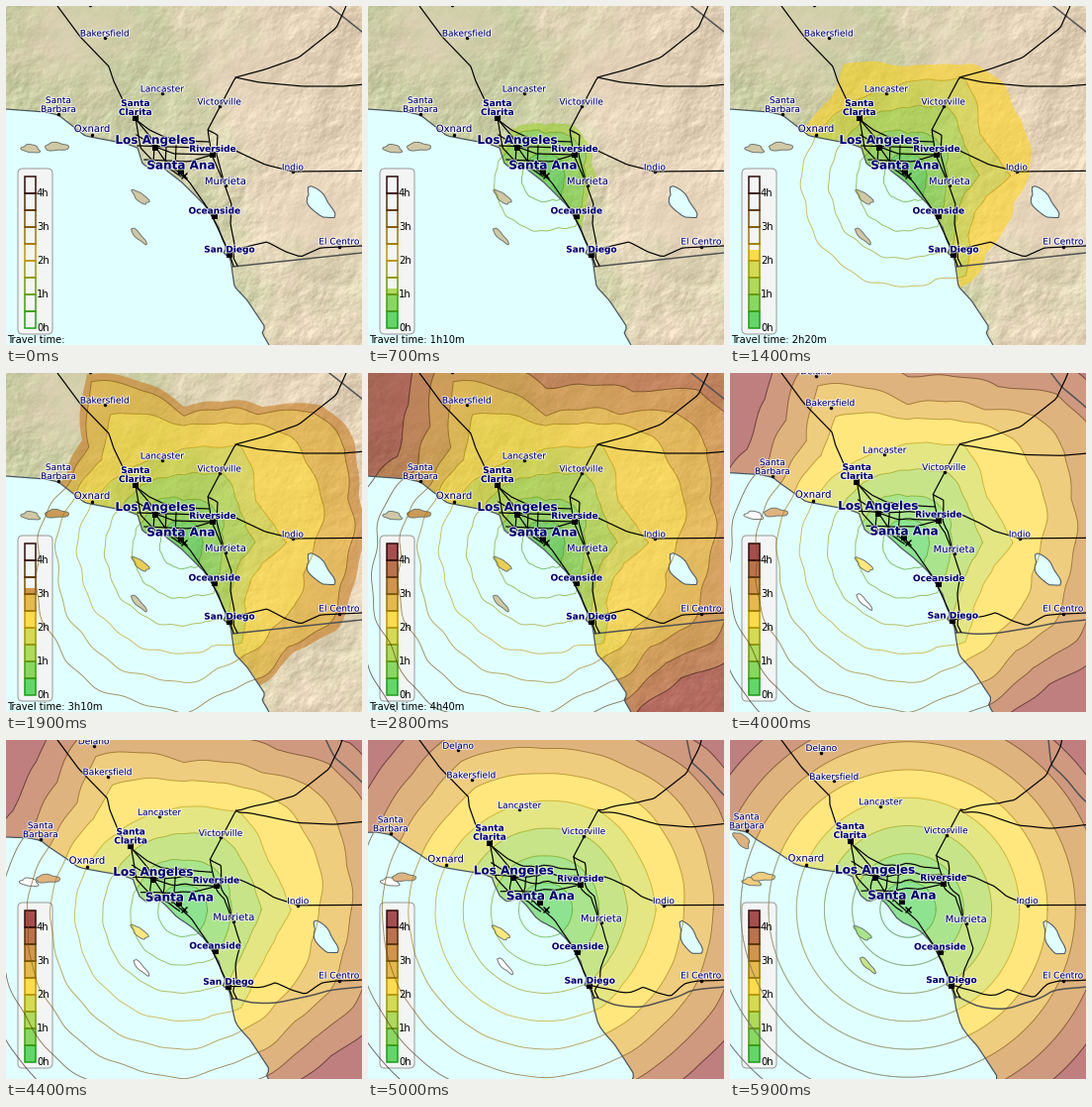
A matplotlib script for the animation above (6 s loop, 360x342 px).

```python
import numpy as np
import matplotlib.pyplot as plt
import matplotlib.patheffects as pe
from matplotlib.animation import FuncAnimation
from matplotlib.patches import FancyBboxPatch, PathPatch, Polygon, Rectangle
from matplotlib.path import Path

W, H = 360, 342
FRAMES, STEP = 60, 100
CENTER = np.array([180.0, 171.0])
RING = 28.2            # pixels per half hour once the map is warped
SEA = "lightcyan"
SHORE = (0.27, 0.33, 0.37)

plt.rcParams["font.family"] = "DejaVu Sans"


def ramp(low, mid, high):
    """Nine colours, one per half hour."""
    stops = np.array([low, mid, high]) / 255
    return [tuple(np.interp(i, [0, 4, 8], stops[:, c]) for c in range(3))
            for i in range(9)]


FILL = ramp((50, 205, 55), (255, 212, 20), (140, 22, 22))
LINE = ramp((25, 155, 20), (190, 150, 0), (45, 8, 8))

# Distance reached after some half hours, from 165 degrees clockwise to -75,
# followed by plain circles over the sea
ANGLES = np.arange(165, -136, -15)


def reach(n, *land):
    return np.array(land + (RING * n,) * (len(ANGLES) - len(land)))


R2 = reach(2, 50, 46, 50, 50, 48, 42, 46, 46, 46, 46, 40, 40, 40, 43, 48, 60, 54)
R4 = reach(4, 105, 98, 95, 90, 90, 94, 99, 113, 98, 84, 88, 104, 80, 78, 85,
           118, 108)
R5 = reach(5, 124, 119, 117, 148, 132, 118, 122, 140, 150, 150, 145, 134, 125,
           130, 125, 130, 133)
R6 = reach(6, 140, 131, 135, 190, 157, 130, 138, 152, 185, 190, 172, 170, 165,
           167, 150, 155, 158)
R8 = reach(8, 190, 175, 195, 245, 215, 185, 190, 200, 250, 255, 240, 240, 240,
           220, 195, 192, 200)
LEVELS = np.array([0, 0.5, *range(1, 9), 10, 30])
TABLE = [0 * R2, 0 * R2 + 7, 0.47 * R2, R2, (R2 + R4) / 2, R4, R5, R6,
         (R6 + R8) / 2, R8, R8 + 100, R8 + 664]


def reach_table(deg):
    """Radius of every level (rows) in the given directions (columns)."""
    a = np.radians(deg)
    return np.array([np.interp(deg, ANGLES, row, period=360)
                     * (1 + 0.012 * np.sin(11 * a + 0.9 * k)
                        + 0.008 * np.sin(23 * a + 1.7 * k))
                     for k, row in enumerate(TABLE)])


def warp(pts):
    """Move points so that their distance is proportional to travel time."""
    d = pts - CENTER
    r = np.hypot(*d.T)
    table = reach_table(np.degrees(np.arctan2(-d[:, 1], d[:, 0])))
    n = np.array([np.interp(r[j], table[:, j], LEVELS) for j in range(len(r))])
    return CENTER + d * (RING * n / np.maximum(r, 1e-6))[:, None]


class Shape:
    """A polyline that slides from its map place to its time place."""

    def __init__(self, *pts):
        p = np.array(pts, float)
        if len(p) > 1:
            s = np.r_[0, np.cumsum(np.hypot(*np.diff(p, axis=0).T))]
            u = np.linspace(0, s[-1], int(s[-1] / 4) + 2)
            p = np.c_[np.interp(u, s, p[:, 0]), np.interp(u, s, p[:, 1])]
        self.start = p
        self.shift = warp(p) - p

    def at(self, m):
        return self.start + m * self.shift


def blob(cx, cy, length, width, tilt):
    """A tilted, slightly uneven oval."""
    a = np.linspace(0, 2 * np.pi, 25)
    wave = 1 + 0.13 * np.sin(3 * a + cx) + 0.08 * np.sin(5 * a + cy)
    u, v = length * np.cos(a) * wave, width * np.sin(a) * wave
    c, s = np.cos(np.radians(tilt)), np.sin(np.radians(tilt))
    return np.c_[cx + u * c - v * s, cy + u * s + v * c]


COAST = Shape(
    (-120, 98), (0, 104), (40, 107), (53, 110), (80, 131), (122, 139),
    (133, 143), (138, 159), (145, 164), (156, 161), (178, 178), (201, 201),
    (215, 223), (219, 236), (223, 244), (220, 249), (227, 255), (231, 283),
    (244, 297), (262, 324), (259, 330), (266, 342), (300, 420))
LAKE = Shape(*blob(317, 199, 19, 9, 52))
BORDERS = [Shape((229, 263), (360, 249), (420, 243)),
           Shape((300, -20), (327, 0), (360, 26), (400, 58))]

VALLEY_ROAD = Shape((40, -24), (52, 0), (75, 31), (104, 61), (109, 76),
                    (122, 103), (146, 132), (151, 142))
NORTH_ROAD = Shape((350, -25), (344, 0), (334, 22), (296, 52), (262, 64),
                   (232, 72), (204, 125), (208, 150), (221, 180), (228, 200),
                   (227, 220), (231, 240), (230, 254), (234, 262))
EAST_ROAD = Shape((232, 72), (256, 77), (300, 81), (340, 81), (400, 76))
DESERT_ROAD = Shape((133, 141), (228, 144), (262, 160), (290, 167), (400, 166))
COAST_ROAD = Shape((151, 142), (160, 155), (185, 177), (206, 207), (216, 228),
                   (226, 250), (230, 262))
SOUTH_ROAD = Shape((226, 250), (238, 244), (264, 238), (283, 248), (298, 253),
                   (318, 244), (400, 240))
BYPASS = Shape((131, 113), (136, 143), (152, 160), (165, 164), (177, 172))
FOOTHILL = Shape((133, 116), (145, 125), (160, 132), (180, 136), (205, 137))
CROSSTOWN = Shape((132, 130), (151, 142), (170, 149), (209, 150))
RIVER_ROAD = Shape((140, 155), (185, 157), (209, 150))
INLAND = Shape((204, 125), (214, 130), (213, 150), (220, 176))
LINKS = [Shape((x, 141), (x - 1, y)) for x, y in ((150, 160), (162, 162),
                                                  (172, 166))]
ROADS = [VALLEY_ROAD, NORTH_ROAD, EAST_ROAD, DESERT_ROAD, COAST_ROAD,
         SOUTH_ROAD, BYPASS, FOOTHILL, CROSSTOWN, RIVER_ROAD, INLAND, *LINKS]

# outline, drift while warping, colour index and time of first arrival, last colour
ISLANDS = [
    (blob(25, 144, 9, 4, 8), (-3, -1), None, 5),
    (blob(51, 142, 12, 4, 0), (-18, -4), (6, 6), 5),
    (blob(136, 193, 10, 4, 38), (-2, 2), (4, 5), 1),
    (blob(134, 232, 11, 2.7, 46), (5, -5), None, 2)]
ISLET = blob(12, 101, 10, 5, 45)

# name, place and height of the label above it
TOWNS = [("Delano", 85, -1, 4), ("Bakersfield", 100, 32, 4),
         ("Santa\nBarbara", 53, 109, 9), ("Lancaster", 158, 88, 4),
         ("Victorville", 216, 101, 4), ("Indio", 290, 167, 4),
         ("El Centro", 337, 243, 5)]
SUBURBS = [("Oxnard", 87, 130, 6), ("Murrieta", 222, 181, 4)]
HUBS = [("Santa\nClarita", 131, 113, 10), ("Riverside", 209, 150, 5.5),
        ("Oceanside", 211, 212, 5), ("San Diego", 226, 251, 5)]
METROS = [("Los Angeles", 151, 143, 7.5), ("Santa Ana", 177, 167, 6)]
CITIES = [(name, Shape((x, y)), rise, size, bold)
          for group, size, bold in ((TOWNS, 9, False), (SUBURBS, 10, False),
                                    (HUBS, 9, True), (METROS, 12, True))
          for name, x, y, rise in group]


def noise(rng, power):
    f = np.hypot(np.fft.fftfreq(H)[:, None], np.fft.fftfreq(W)[None])
    f[0, 0] = 1
    z = np.fft.ifft2(np.fft.fft2(rng.normal(size=(H, W))) / f ** power).real
    return (z - z.mean()) / z.std()


def make_relief():
    rng = np.random.default_rng(4)
    y, x = np.mgrid[0:H, 0:W]

    def basin(cx, cy, r):
        return np.exp(-((x - cx) ** 2 + (y - cy) ** 2) / r ** 2)

    gy, gx = np.gradient(noise(rng, 1.8))
    shade = np.clip((gx + gy) / (gx + gy).std(), -2.5, 2.5)
    flat = np.clip(basin(80, 15, 60) + 0.6 * basin(230, 60, 60)
                   + 0.7 * basin(315, 215, 45) + 0.5 * basin(160, 150, 30), 0, 0.9)
    dry = 1 / (1 + np.exp(-(x - 225 - 0.25 * (y - 170)) / 35))
    dry = np.clip(dry + 0.22 * noise(rng, 1.4) + 0.4 * flat, 0, 1)[..., None]
    green, tan = np.array([200, 205, 163]), np.array([229, 212, 186])
    rgb = green + (tan - green) * dry + (10 * shade * (1 - flat))[..., None]
    return np.clip(rgb / 255, 0, 1)


RELIEF = make_relief()
SAND = np.array([208, 200, 165]) / 255
THETA = np.arange(0, 361, 1.5)
TURN = np.c_[np.cos(np.radians(THETA)), -np.sin(np.radians(THETA))]
RADII = reach_table(THETA)


def contour(n, m):
    k = min(np.searchsorted(LEVELS, n, side="right") - 1, len(LEVELS) - 2)
    u = (n - LEVELS[k]) / (LEVELS[k + 1] - LEVELS[k])
    r = RADII[k] + u * (RADII[k + 1] - RADII[k])
    return CENTER + TURN * (r + m * (RING * n - r))[:, None]


def band(inner, outer):
    pts = np.vstack([outer, inner[::-1]])
    codes = np.full(len(pts), Path.LINETO)
    codes[[0, len(outer)]] = Path.MOVETO
    return Path(pts, codes)


def progress(ms, start, end):
    return float(np.clip((ms - start) / (end - start), 0, 1))


def mix(a, b, t):
    return tuple(np.array(a) * (1 - t) + np.array(b) * t)


fig = plt.figure(figsize=(W / 72, H / 72), dpi=72)
ax = fig.add_axes([0, 0, 1, 1])
HALO = [pe.withStroke(linewidth=2, foreground=(1, 1, 1, 0.75))]


def line(pts, color, lw, **kw):
    return ax.plot(pts[:, 0], pts[:, 1], color=color, lw=lw, **kw)[0]


def draw_times(n, m):
    for i in range(9):
        if n > i:
            outer = contour(min(n, 10 if i == 8 else i + 1), m)
            ax.add_patch(PathPatch(band(contour(i, m), outer), fc=FILL[i],
                                   alpha=0.55, lw=0))
    for i in range(1, 9):
        if n >= i:
            line(contour(i, m), LINE[i], 0.9, alpha=0.65)


def draw_sea(m, rings):
    coast = COAST.at(m)
    outline = np.vstack([coast, [(300, 700), (-400, 700), (-400, 98)]])
    sea = ax.add_patch(Polygon(outline, fc=SEA, lw=0))
    if rings:
        for i in range(1, 9):
            line(contour(i, 1), (0.5, 0.63, 0.66), 0.8,
                 alpha=0.6 * rings).set_clip_path(sea)
    line(coast, SHORE, 1.2)
    ax.add_patch(Polygon(LAKE.at(m), fc=SEA, ec=SHORE, lw=1))


def draw_islands(n, m, fade, rings):
    ground = mix(SAND, (1, 1, 1), fade)
    edge = (0.4, 0.44, 0.42)
    for pts, drift, first, last in ISLANDS:
        color = ground
        if first and n >= first[1]:
            color = mix(ground, FILL[first[0]], 0.55)
        color = mix(color, mix((1, 1, 1), FILL[last], 0.55), rings)
        ax.add_patch(Polygon(pts + m * np.array(drift), fc=color, ec=edge, lw=0.9))
    if rings:
        ax.add_patch(Polygon(ISLET, fc=mix((1, 1, 1), FILL[6], 0.55), ec=edge,
                             lw=0.9, alpha=rings))


def draw_cities(m):
    places = [spot.at(m)[0] for _, spot, *_ in CITIES]
    for (x, y), (*_, bold) in zip(places, CITIES):
        ax.plot(x, y, "s" if bold else "o", color="black", mew=0,
                ms=5.5 if bold else 3.5)
    ax.plot(*CENTER, "x", color="black", ms=5.5, mew=1.4)
    for (x, y), (name, _, rise, size, bold) in zip(places, CITIES):
        ax.text(x, y - rise, name, size=size, weight="bold" if bold else "normal",
                color=(0, 0, 0.45), ha="center", va="center", linespacing=1.0,
                path_effects=HALO, clip_on=True)


def draw_legend(n):
    ax.add_patch(FancyBboxPatch((17, 169), 25, 157, fc=(0.96, 0.96, 0.96, 0.92),
                                boxstyle="round,pad=5,rounding_size=5",
                                ec=(0.6, 0.6, 0.6), lw=1))
    for i in range(9):
        top = min(n - i, 1)
        if top > 0:
            ax.add_patch(Rectangle((18.5, 325 - 17 * (i + top)), 11, 17 * top,
                                   fc=FILL[i], alpha=0.75, lw=0))
    for i in range(9):
        ax.add_patch(Rectangle((18.5, 308 - 17 * i), 11, 17, fill=False,
                               ec=LINE[i], lw=1.5))
    for h in range(5):
        ax.text(31, 324.5 - 34 * h, f"{h}h", size=10, va="center")


def draw(frame):
    ms = frame * STEP
    minutes = min(10 * frame, 280)
    n = minutes / 30 if minutes < 280 else 10
    fade = progress(ms, 2800, 3500)
    m = progress(ms, 3500, 5300)
    rings = progress(ms, 5300, 5900)

    ax.clear()
    ax.axis("off")
    if fade < 1:
        ax.imshow(RELIEF * (1 - fade) + fade, extent=(0, W, H, 0), aspect="auto")
    ax.set(xlim=(0, W), ylim=(H, 0), autoscale_on=False)

    draw_times(n, m)
    draw_sea(m, rings)
    draw_islands(n, m, fade, rings)
    for b in BORDERS:
        line(b.at(m), (0.32, 0.32, 0.32), 1.5)
    for r in ROADS:
        line(r.at(m), "black", 1.2)
    draw_cities(m)
    draw_legend(n)
    if fade < 1:
        label = "Travel time:"
        if minutes:
            label += f" {minutes // 60}h{minutes % 60:02d}m"
        ax.text(1, 340, label, size=10, va="baseline", alpha=1 - fade)
    return []


anim = FuncAnimation(fig, draw, frames=FRAMES, interval=STEP, repeat=True,
                     repeat_delay=0)
plt.show()
```
